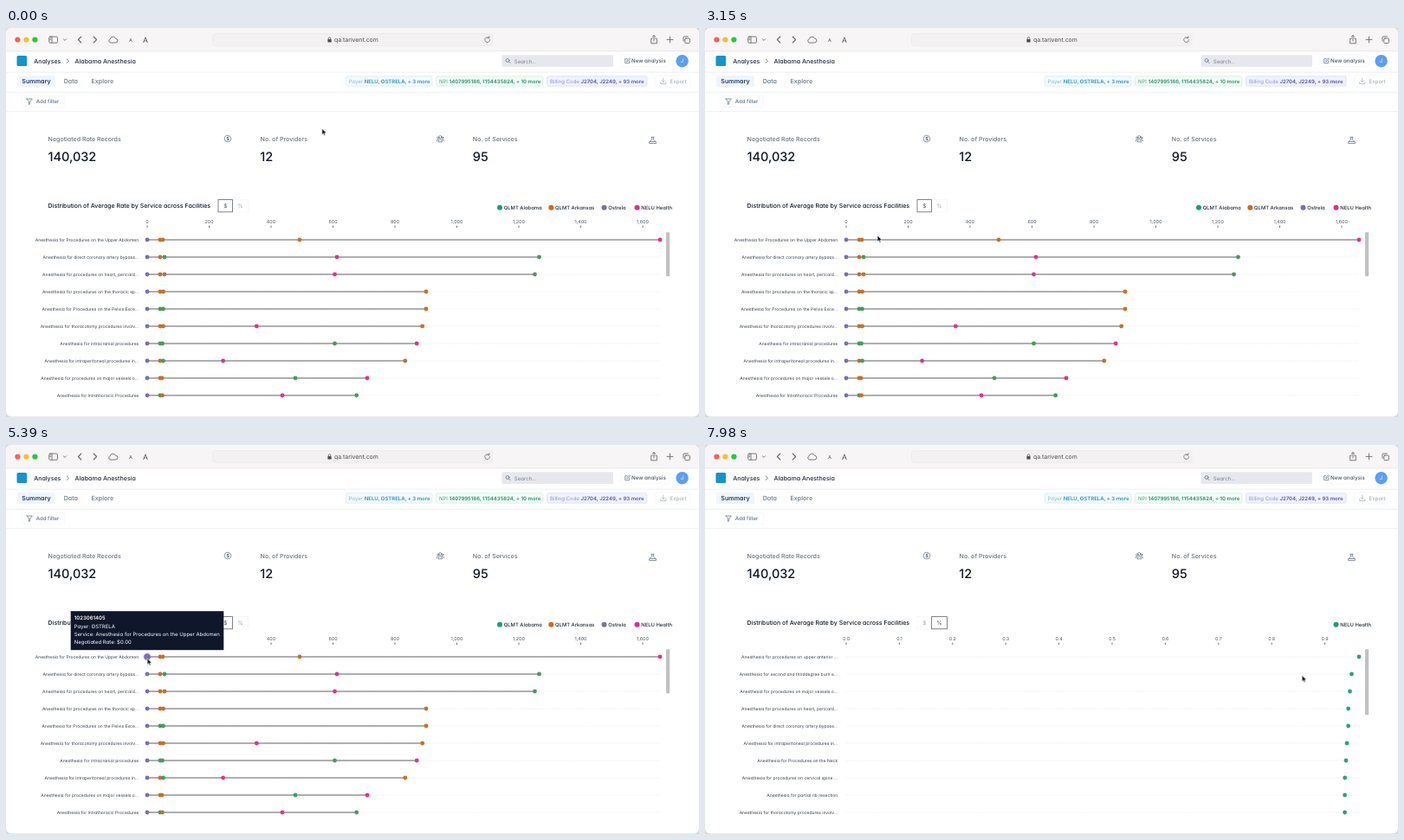
These frames come from a looping animation (800 by 450 pixels, 8 s). An HTML page:

```html
<!DOCTYPE html>
<html lang="en">
<head>
<meta charset="utf-8">
<title>Analysis dashboard</title>
<style>
html, body { margin: 0; width: 100%; height: 100%; overflow: hidden; background: #d9dadb; }
svg { display: block; width: 100vw; height: 100vh; }
text { font-family: Inter, "Liberation Sans", sans-serif; text-rendering: geometricPrecision; white-space: pre; }
.app text { font-feature-settings: "cv11"; }
.mid { text-anchor: middle; }
.end { text-anchor: end; }
.w5 { font-weight: 500; }
.w6 { font-weight: 600; }
.ico { fill: none; stroke: #6b6b6d; stroke-width: .9; stroke-linecap: round; stroke-linejoin: round; }
.dim { stroke: #64748b; stroke-width: .75; }
.pale { stroke: #a7b0bd; stroke-width: .75; }
.rule { stroke: #ebecef; stroke-width: .8; }
.soft { fill: #fff; stroke: #f4f5f7; stroke-width: .7; }
.on { fill: #fff; stroke: #6a6e76; stroke-width: .85; }
.grid { stroke: #ececec; stroke-width: .7; stroke-dasharray: 1.5 1; }

.cursor { animation: move 8s linear infinite; }
.rates, .shares, .tipA, .tipB, .arrow, .hand { animation: 8s step-end infinite; }
.rates { animation-name: rates; }
.shares { animation-name: shares; }
.tipA { animation-name: tipA; }
.tipB { animation-name: tipB; }
.arrow { animation-name: arrow; }
.hand { animation-name: hand; }

@keyframes move {
  0%, 3.5% { transform: translate(364.8px, 116.3px); }
  5.25%, 7% { transform: translate(352px, 127px); }
  14.875%, 17.5% { transform: translate(288px, 178px); }
  30.625% { transform: translate(214.6px, 234.6px); }
  41.125%, 42.875% { transform: translate(196px, 241px); }
  47.25%, 51.625% { transform: translate(187px, 244px); }
  52.5% { transform: translate(173.8px, 246.6px); }
  56%, 75.25% { transform: translate(163.2px, 246.8px); }
  76.125% { transform: translate(175.8px, 247.3px); animation-timing-function: ease-in-out; }
  84.875%, 91% { transform: translate(272.5px, 206px); animation-timing-function: ease-in-out; }
  99.75%, 100% { transform: translate(689.3px, 266.5px); }
}
@keyframes rates { 0% { visibility: visible; } 85.7%, 100% { visibility: hidden; } }
@keyframes shares { 0% { visibility: hidden; } 85.7%, 100% { visibility: visible; } }
@keyframes tipA { 0% { visibility: hidden; } 52.4% { visibility: visible; } 55.9%, 100% { visibility: hidden; } }
@keyframes tipB { 0% { visibility: hidden; } 55.9% { visibility: visible; } 76%, 100% { visibility: hidden; } }
@keyframes arrow { 0% { visibility: visible; } 83.125% { visibility: hidden; } 91.875%, 100% { visibility: visible; } }
@keyframes hand { 0% { visibility: hidden; } 83.125% { visibility: visible; } 91.875%, 100% { visibility: hidden; } }
</style>
</head>
<body>
<svg viewBox="0 0 800 450">
  <rect width="800" height="449.5" rx="6" fill="#fff"/>

  <!-- browser bar -->
  <path d="M0 27V6a6 6 0 0 1 6-6H794a6 6 0 0 1 6 6V27Z" fill="#f8f5f6"/>
  <path d="M0 26.8H800" stroke="#e6e4e5" stroke-width=".8"/>
  <circle cx="13.4" cy="13.5" r="3.1" fill="#fe5f57"/>
  <circle cx="23.4" cy="13.5" r="3.1" fill="#febc2e"/>
  <circle cx="33.4" cy="13.5" r="3.1" fill="#28c840"/>
  <rect x="238.5" y="6.5" width="323.5" height="14" rx="3" fill="#f4f1f2" stroke="#eae8e9" stroke-width=".6"/>
  <g class="ico">
    <rect x="49.7" y="10" width="9.8" height="7.2" rx="1.4"/>
    <path d="M53 10V17.2M50.9 12h.8M50.9 13.7h.8"/>
    <path d="M66.4 12.8l1.6 1.6 1.6-1.6"/>
    <path d="M86.8 10l-3.4 3.5 3.4 3.5" stroke-width="1.1"/>
    <path d="M101.2 10l3.4 3.5-3.4 3.5" stroke-width="1.1"/>
    <path d="M120.6 17a2.2 2.2 0 0 1-.2-4.3 3.1 3.1 0 0 1 6-.5 2.4 2.4 0 0 1 .2 4.8Z"/>
    <path d="M557.6 11.4a2.9 2.9 0 1 0 1 2.2M557.9 9.6v2h-2" stroke-width=".8"/>
    <path d="M746.3 12.2h-1.6v5.6h6.6v-5.6h-1.6M748 15V8.6M746.1 10.3L748 8.5l1.9 1.8"/>
    <path d="M763 13.4h7M766.5 9.9v7"/>
    <rect x="783.8" y="12" width="5.6" height="5.6" rx="1"/>
    <path d="M782 15.2V11a1.1 1.1 0 0 1 1.1-1.1h4.3"/>
  </g>
  <g fill="#4b4b4d">
    <text class="mid" x="144" y="15.6" font-size="5.6">A</text>
    <text class="mid" x="161" y="16.5" font-size="8.6">A</text>
    <rect x="371.4" y="13" width="4.2" height="3.6" rx=".6"/>
    <path d="M372.2 13v-1a1.3 1.3 0 0 1 2.6 0v1" fill="none" stroke="#4b4b4d" stroke-width=".7"/>
    <text x="379" y="16.2" font-size="6.9">qa.tarivent.com</text>
  </g>

  <g class="app">
    <!-- header -->
    <rect x="12.5" y="32" width="11.6" height="12" rx="1.5" fill="#1593cb"/>
    <g class="w5" font-size="7.05" fill="#1e293b">
      <text x="32.2" y="40.8">Analyses</text>
      <text x="79.6" y="40.8">Alabama Anesthesia</text>
    </g>
    <path class="ico" d="M70.3 36l2.2 2.2-2.2 2.2"/>
    <rect x="572.5" y="31.3" width="128.5" height="13.6" rx="1.5" fill="#e6e8ed"/>
    <circle class="ico dim" cx="579" cy="37.5" r="2"/><path class="ico dim" d="M580.5 39l1.7 1.7"/>
    <text x="586.8" y="40.5" font-size="6.1" fill="#77808f">Search...</text>
    <rect class="soft" x="709.5" y="31.5" width="56" height="13.3" rx="2"/>
    <path class="ico dim" d="M717 35.7h-2.3v5h5v-2.4M716.8 38.7l.3-1.4 2.6-2.6 1 1-2.6 2.6Z"/>
    <text class="w5" x="722" y="40.4" font-size="6.2" fill="#475569">New analysis</text>
    <circle cx="780.6" cy="38.2" r="7.2" fill="#5c9ff0"/>
    <text class="mid" x="780.5" y="40.4" font-size="6" fill="#fff">J</text>
    <path class="rule" d="M0 51.2H800M0 74.3H800M0 96.6H800"/>

    <!-- tabs -->
    <rect x="13" y="55" width="44" height="13.4" rx="2" fill="#eff5fc"/>
    <g class="w5" font-size="7.1">
      <text class="w6" x="18.3" y="64.2" fill="#223a74">Summary</text>
      <text x="66.7" y="64.2" fill="#64748b">Data</text>
      <text x="98.6" y="64.2" fill="#64748b">Explore</text>
    </g>
    <g stroke-width=".7">
      <rect x="392.5" y="55.8" width="99.5" height="11.4" rx="2" fill="#f4fafe" stroke="#d5e9f6"/>
      <rect x="496.5" y="55.8" width="123.5" height="11.4" rx="2" fill="#f2fcf6" stroke="#ceeedb"/>
      <rect x="624.5" y="55.8" width="115.5" height="11.4" rx="2" fill="#f1f3fe" stroke="#d3d8f9"/>
    </g>
    <g font-size="6">
      <text x="395.5" y="63.7" fill="#79bde4">Payer <tspan class="w6" fill="#2492cf">NELU, OSTRELA, + 3 more</tspan></text>
      <text x="500" y="63.7" fill="#3fae7c">NPI <tspan class="w6" fill="#1f9464">1407995186, 1154435824, + 10 more</tspan></text>
      <text x="628" y="63.7" fill="#8a8ff0">Billing Code <tspan class="w6" fill="#4b4fcf">J2704, J2249, + 93 more</tspan></text>
    </g>
    <rect class="soft" x="749.5" y="55" width="40" height="13.2" rx="2"/>
    <path class="ico pale" d="M758.8 58v4.4M757 60.8l1.8 1.8 1.8-1.8M755.8 62.6v2h6v-2"/>
    <text class="w5" x="766.6" y="64" font-size="6.1" fill="#a7b0bd">Export</text>

    <rect class="soft" x="18.5" y="78.5" width="49" height="13" rx="2"/>
    <path class="ico dim" d="M24 82h6.4l-2.5 3v2.6l-1.4.9V85Z"/>
    <text class="w5" x="34.8" y="87.2" font-size="6.05" fill="#64748b">Add filter</text>

    <!-- figures -->
    <g class="w5" font-size="7.05" fill="#6b7280">
      <text x="48.6" y="131">Negotiated Rate Records</text>
      <text x="293.6" y="131">No. of Providers</text>
      <text x="538.8" y="131">No. of Services</text>
    </g>
    <g class="w5" font-size="14.5" fill="#0f172a">
      <text x="48.4" y="154.1">140,032</text>
      <text x="293.2" y="154.1">12</text>
      <text x="538.8" y="154.1">95</text>
    </g>
    <g class="ico dim">
      <path d="M256 124.3l2.8 1 1.1 2.8-1.1 2.8-2.8 1-2.8-1-1.1-2.8 1.1-2.8Z"/>
      <circle cx="501.3" cy="126" r="1.5"/><circle cx="498.7" cy="127" r="1.1"/><circle cx="503.9" cy="127" r="1.1"/>
      <path d="M498.9 131.4a2.4 2.6 0 0 1 4.8 0ZM497 130.8a1.9 2 0 0 1 2-2M505.6 130.8a1.9 2 0 0 0-2-2"/>
      <path d="M745 126.3h3M745.6 126.3v3l-3 2.3v1.9h7.8v-1.9l-3-2.3v-3M743.2 131.5h6.4"/>
    </g>
    <text class="mid w6" x="256" y="130.2" font-size="5.6" fill="#475569">$</text>

    <!-- chart head -->
    <text class="w5" x="48.6" y="208.3" font-size="7.01" fill="#0f172a">Distribution of Average Rate by Service across Facilities</text>
    <g class="mid" font-size="6.4">
      <g class="rates">
        <rect class="soft" x="262" y="198.5" width="17.5" height="14.5"/>
        <rect class="on" x="245" y="198.6" width="16.5" height="14.2"/>
        <text x="253.2" y="208" fill="#475569">$</text><text x="270.3" y="208" fill="#9aa3b0">%</text>
      </g>
      <g class="shares">
        <rect class="soft" x="245" y="198.5" width="16.5" height="14.5"/>
        <rect class="on" x="261.6" y="198.6" width="17.8" height="14.2"/>
        <text x="253.2" y="208" fill="#9aa3b0">$</text><text x="270.3" y="208" fill="#475569">%</text>
      </g>
    </g>

    <g class="rates" id="rates"></g>
    <g class="shares" id="shares"></g>
    <g class="tipA" id="tipA"></g>
    <g class="tipB" id="tipB"></g>
  </g>

  <g class="cursor">
    <path class="arrow" d="M0 0V7.2L1.6 5.7 2.7 8.2 3.9 7.7 2.8 5.3H5Z" fill="#000" stroke="#fff" stroke-width=".6"/>
    <path class="hand" d="M-1 .3c.7-.5 1.3 0 1.6.7l.9 1.9.4-.2c.5-.4 1-.2 1.3.2.5-.3 1 0 1.2.4.6-.2 1 .2 1.1.8l.3 2.2c.1 1.3-.7 2.3-2 2.6-1.5.3-2.3-.3-3.1-1.2L-1.6 5.6c-.3-.7.5-1.2 1.1-.8l.4.3L-1.6 1.5c-.2-.5 0-1 .6-1.2Z" fill="#fff" stroke="#222" stroke-width=".7"/>
  </g>
</svg>
<script>
const colors = { g: '#479b5c', o: '#c6702a', p: '#7570b3', m: '#e3318f', t: '#2aa27a' };
const rowY = i => 245 + 20 * i;
const byId = id => document.getElementById(id);

const text = (x, y, size, fill, s, cls = '') =>
  `<text class="${cls}" x="${x}" y="${y}" font-size="${size}" fill="${fill}">${s}</text>`;
const dot = (x, y, r, fill) => `<circle cx="${x}" cy="${y}" r="${r}" fill="${fill}"/>`;

function axis(count, step, label) {
  let out = '';
  for (let i = 0; i < count; i++) {
    const x = 163 + i * step;
    out += text(x, 226.3, 5.4, '#4b5563', label(i), 'mid') +
      `<path d="M${x} 228.6v2.4" stroke="#555" stroke-width=".8"/>`;
  }
  return out;
}

const legend = items => items.map(([x, fill, name]) =>
  dot(x, 207.8, 3, fill) + text(x + 4.8, 209.9, 5.85, '#1e293b', name, 'w5')).join('');

const rowBase = (name, y) =>
  `<path class="grid" d="M163 ${y}H755"/>` + text(153.2, y + 1.8, 5, '#374151', name, 'end');

const thumb = h => `<rect x="762" y="236.3" width="4.2" height="${h}" rx="1" fill="#c1c1c1"/>`;

// each dot: colour key followed by its x position
const rates = [
  ['Anesthesia for Procedures on the Upper Abdomen', 'o178 o181 o339 m755'],
  ['Anesthesia for direct coronary artery bypass...', 'o178 g183 m382 g615.5'],
  ['Anesthesia for procedures on heart, pericard...', 'o178 o183 m379.5 g610.5'],
  ['Anesthesia for procedures on the thoracic sp...', 'o178 o181.5 o485'],
  ['Anesthesia for Procedures on the Pelvis Exce...', 'g178 g181.5 o485'],
  ['Anesthesia for thoracotomy procedures involv...', 'o178 o181.5 m289.3 o480.7'],
  ['Anesthesia for intracranial procedures', 'g178 g180.5 g379.5 m474.2'],
  ['Anesthesia for intraperitoneal procedures in...', 'o178 g181.5 m250.6 o460.8'],
  ['Anesthesia for procedures on major vessels o...', 'o178 o180 g334 m417'],
  ['Anesthesia for Intrathoracic Procedures', 'g178 o180.5 m319 g404.7']
];
const shares = [
  ['Anesthesia for procedures on upper anterior ...', 755],
  ['Anesthesia for second and thirddegree burn e...', 746.5],
  ['Anesthesia for procedures on major vessels o...', 744.5],
  ['Anesthesia for procedures on heart, pericard...', 742.6],
  ['Anesthesia for direct coronary artery bypass...', 742.6],
  ['Anesthesia for intraperitoneal procedures in...', 741],
  ['Anesthesia for Procedures on the Neck', 740],
  ['Anesthesia for procedures on cervical spine ...', 738.7],
  ['Anesthesia for partial rib resection', 738.6],
  ['Anesthesia for thoracotomy procedures involv...', 738.6]
];

byId('rates').innerHTML = axis(9, 71.5, i => (i * 200).toLocaleString('en-US')) +
  legend([[570, '#1b9e77', 'QLMT Alabama'], [629.3, '#d2661a', 'QLMT Arkansas'],
    [690.5, '#7570b3', 'Ostrela'], [728.5, '#e7298a', 'NELU Health']]) +
  rates.map(([name, list], i) => {
    const y = rowY(i);
    const dots = ('p163 ' + list).split(' ').map(d => [+d.slice(1), colors[d[0]]]);
    return rowBase(name, y) +
      `<path d="M163 ${y}H${dots.at(-1)[0]}" stroke="#969696" stroke-width="1.3"/>` +
      dots.map(([x, fill]) => dot(x, y, 2.4, fill)).join('');
  }).join('') + thumb(51);

byId('shares').innerHTML = axis(10, 61.4, i => (i / 10).toFixed(1)) +
  legend([[728.5, '#1b9e77', 'NELU Health']]) +
  shares.map(([name, x], i) => rowBase(name, rowY(i)) + dot(x, rowY(i), 2.4, colors.t)).join('') + thumb(76);

function tip(x, fill, id, payer, rate) {
  const left = x - 88.3;
  const lines = ['Payer: ' + payer, 'Service: Anesthesia for Procedures on the Upper Abdomen', 'Negotiated Rate: ' + rate];
  return `<circle cx="${x}" cy="245" r="3.6" fill="${fill}" stroke="${fill}" stroke-opacity=".45" stroke-width="1.6"/>` +
    `<rect x="${left}" y="192.2" width="176.6" height="45" fill="#0f172a"/>` +
    text(left + 4, 202.3, 6, '#fff', id, 'w6') +
    lines.map((s, i) => text(left + 4, 212 + 9.1 * i, 6, '#fff', s)).join('');
}
byId('tipA').innerHTML = tip(178.2, '#d2661a', '1003260480', 'QLMT_ARKANSAS', '$42.05');
byId('tipB').innerHTML = tip(163, colors.p, '1023061405', 'OSTRELA', '$0.00');
</script>
</body>
</html>
```
